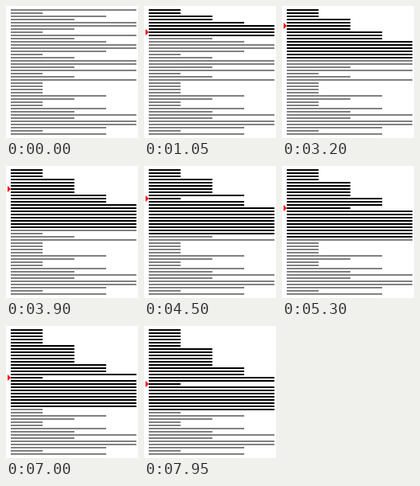
An HTML page with a canvas for the animation above (8 s loop, 166 px wide and 166 px high).

```html
<!DOCTYPE html>
<html lang="en">
<head>
<meta charset="utf-8">
<title>Insertion sort</title>
<style>
  html, body { margin: 0; width: 100%; height: 100%; overflow: hidden; background: #fff; }
  canvas { display: block; }
</style>
</head>
<body>
<canvas id="stage" width="166" height="166"></canvas>
<script>
const STEP_MS = 50, STEPS = 160;
const LEFT = 6, RIGHT = 164, PITCH = 4, UNIT = 40;
const start = [...'4132442142344312442412414111132113242443131'.slice(0, 0) +
               '4132442142344312442412411113211324244313'];
const ctx = document.getElementById('stage').getContext('2d');

// One step per comparison: swap if needed, then point at the lower slot.
function recordSteps(values) {
  const bars = values.map(Number);
  const steps = [{ bars: [...bars], sorted: 0, pointer: -1 }];
  for (let i = 1; i < bars.length; i++) {
    for (let k = i; k > 0; k--) {
      const swap = bars[k] < bars[k - 1];
      if (swap) [bars[k], bars[k - 1]] = [bars[k - 1], bars[k]];
      steps.push({ bars: [...bars], sorted: i + 1, pointer: k - 1 });
      if (!swap) break;
    }
  }
  return steps;
}

function drawPointer(index) {
  const y = PITCH * index + 5;
  ctx.fillStyle = '#f00';
  ctx.beginPath();
  ctx.moveTo(2, y - 4);
  ctx.lineTo(6, y);
  ctx.lineTo(2, y + 4);
  ctx.fill();
}

function draw({ bars, sorted, pointer }) {
  ctx.fillStyle = '#fff';
  ctx.fillRect(0, 0, 166, 166);
  if (pointer >= 0) drawPointer(pointer);
  bars.forEach((value, i) => {
    ctx.fillStyle = i < sorted ? '#000' : '#808080';
    ctx.fillRect(LEFT, PITCH * (i + 1), Math.min(value * UNIT, RIGHT - LEFT), 2);
  });
}

const steps = recordSteps(start);
const origin = performance.now();

function tick() {
  const elapsed = performance.now() - origin;
  draw(steps[Math.floor(elapsed / STEP_MS) % STEPS]);
  requestAnimationFrame(tick);
}
tick();
</script>
</body>
</html>
```
